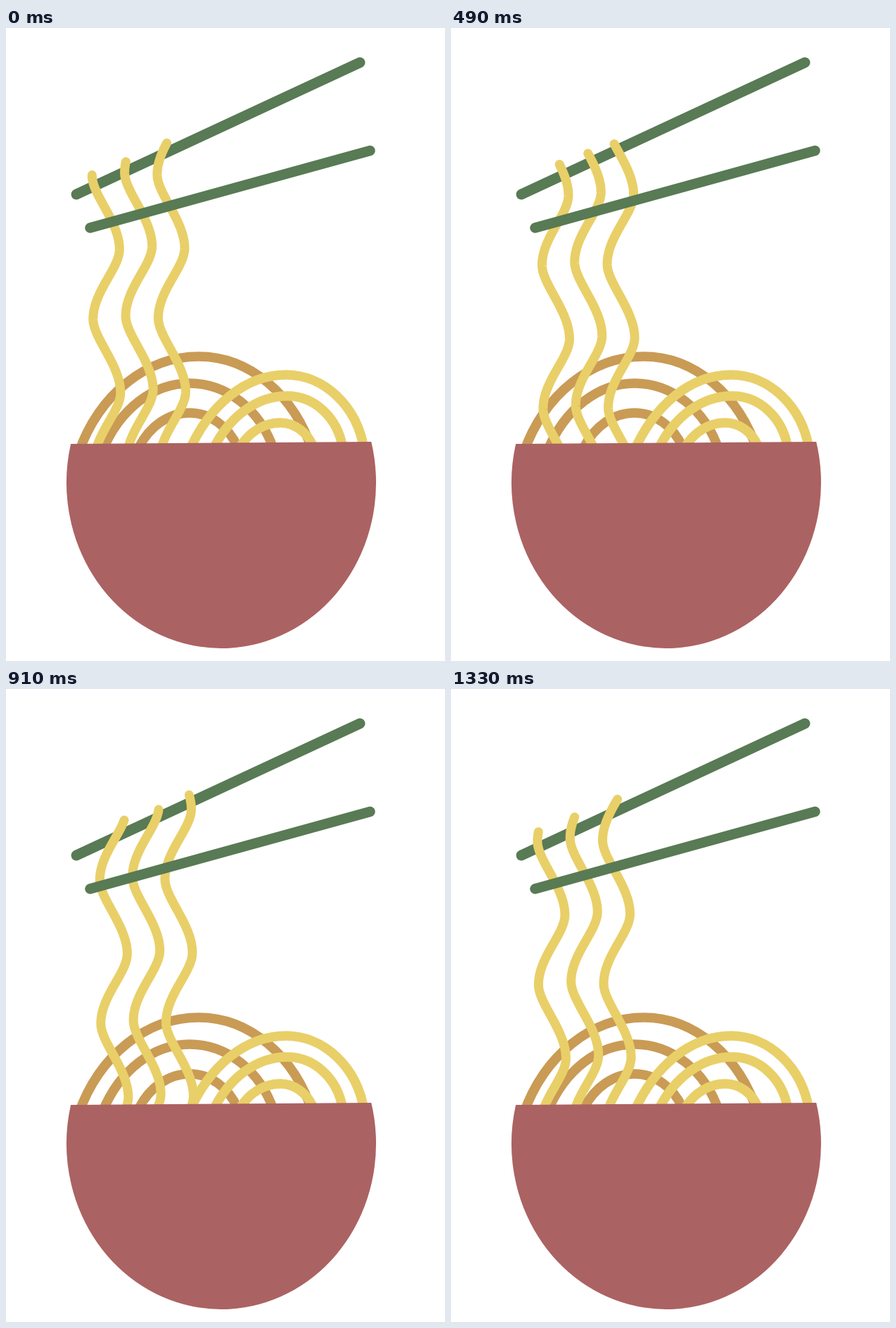
These frames come from a looping animation (624x898 px, 1400 ms). An HTML page with a canvas:

```html
<!DOCTYPE html>
<html lang="en">
<head>
<meta charset="utf-8">
<title>Noodle bowl</title>
<style>
  html, body { margin: 0; width: 100%; height: 100%; overflow: hidden; background: #fff; }
  canvas { display: block; }
</style>
</head>
<body>
<canvas id="stage" width="624" height="898"></canvas>
<script>
const ctx = document.getElementById('stage').getContext('2d');
const LOOP = 1400, STEP = 70, TURN = 890;
const GREEN = '#587a54', YELLOW = '#e9cf68', BROWN = '#c99b55', RED = '#ab6262';
const WAVE = 203.5, LEAN = 1.5, RIM = 590;

// Height of each strand's upper end over time
const TIMES = [0, 210, 490, 700, 910, 1050, 1190, 1330, 1400];
const strands = [
  { dx: 0, dy: 0, tip: [208, 203, 193, 187, 186, 183, 191, 202, 208] },
  { dx: 46.3, dy: -4.5, tip: [189, 188, 178, 168, 171, 174, 177, 181, 189] },
  { dx: 92.6, dy: -1.5, tip: [163, 169, 164, 155, 150, 147, 147, 156, 163] }
];

const mix = (a, b, k) => a + (b - a) * k;
const easeOut = (k, power) => 1 - Math.pow(1 - k, power);

function track(times, values, t) {
  let i = 1;
  while (i < times.length - 1 && t >= times[i]) i++;
  return mix(values[i - 1], values[i], (t - times[i - 1]) / (times[i] - times[i - 1]));
}

function bezier(a, b, c, d, k) {
  const m = 1 - k;
  return m * m * m * a + 3 * m * m * k * b + 3 * m * k * k * c + k * k * k * d;
}

function stroke(color, width, cap = 'round') {
  ctx.strokeStyle = color;
  ctx.lineWidth = width;
  ctx.lineCap = cap;
  ctx.lineJoin = 'round';
  ctx.stroke();
}

function stick(x1, y1, x2, y2, width) {
  ctx.beginPath();
  ctx.moveTo(x1, y1);
  ctx.lineTo(x2, y2);
  stroke(GREEN, width);
}

// Arch from the apex (x, y) to a foot on the rim at each side;
// a larger slant makes that foot less steep
function arch(color, x, y, leftFoot, leftSlant, rightFoot, rightSlant) {
  const quarter = (foot, slant, from) => {
    const w = Math.abs(foot - x) / Math.sqrt(1 - slant * slant);
    const h = (RIM - y) / (1 - slant);
    const low = Math.asin(slant);
    const top = Math.PI * 1.5;
    const side = Math.PI / 2 - low + 0.06;
    if (from < 0) ctx.ellipse(x, y + h, w, h, 0, top - side, top);
    else ctx.ellipse(x, y + h, w, h, 0, top, top + side);
  };
  ctx.beginPath();
  quarter(leftFoot, leftSlant, -1);
  quarter(rightFoot, rightSlant, 1);
  stroke(color, 13.5, 'butt');
}

function strand(x, y, tip) {
  // Crests alternate right and left; each turn is tighter just below its crest
  const crest = n => {
    const turn = Math.floor(n / 2), left = n & 1;
    return {
      x: x + turn * LEAN + (left ? 123.8 : 161.3),
      y: y + turn * WAVE + (left ? 413 : 314)
    };
  };
  ctx.beginPath();
  for (let n = -2; n < 5; n++) {
    const a = crest(n), b = crest(n + 1);
    for (let i = 0; i < 120; i++) {
      const k = i / 120;
      const py = bezier(a.y, a.y + 27, b.y - 39, b.y, k);
      if (py >= tip && py < 640) ctx.lineTo(bezier(a.x, a.x, b.x, b.x, k), py);
    }
  }
  stroke(YELLOW, 13);
}

function bowl() {
  const edge = y => Math.asin((y - 645) / 235);
  ctx.beginPath();
  ctx.ellipse(306, 645, 220, 235, 0, edge(587), Math.PI - edge(RIM));
  ctx.closePath();
  ctx.fillStyle = RED;
  ctx.fill();
}

// Strands rise by one wave per loop, swaying right and then back
function sway(t) {
  if (t < TURN) return { x: mix(0, 10.2, t / TURN), y: mix(0, -139, t / TURN) };
  const k = (t - TURN) / (LOOP - TURN);
  return {
    x: mix(10.2, -LEAN, easeOut(k, 1.5)),
    y: mix(-139, -WAVE, easeOut(k, 1.15))
  };
}

function draw(t) {
  const shift = sway(t);
  ctx.fillStyle = '#fff';
  ctx.fillRect(0, 0, 624, 898);
  stick(100, 236, 503, 49, 15);
  arch(BROWN, 274, 466, 108, 0.45, 432, 0.42);
  arch(BROWN, 261, 504, 141.5, 0.52, 377.5, 0.42);
  arch(BROWN, 261, 546, 191.5, 0.57, 327, 0.5);
  for (const s of strands) strand(s.dx + shift.x, s.dy + shift.y, track(TIMES, s.tip, t));
  arch(YELLOW, 398, 492, 265, 0.58, 507.5, 0.24);
  arch(YELLOW, 400, 522, 298.5, 0.58, 477.5, 0.24);
  arch(YELLOW, 390, 560, 335.5, 0.62, 435, 0.5);
  stick(119.5, 283.5, 517.5, 174, 14.5);
  bowl();
}

function tick() {
  const t = performance.now() % LOOP;
  draw(Math.floor(t / STEP) * STEP);
  requestAnimationFrame(tick);
}
tick();
</script>
</body>
</html>
```
